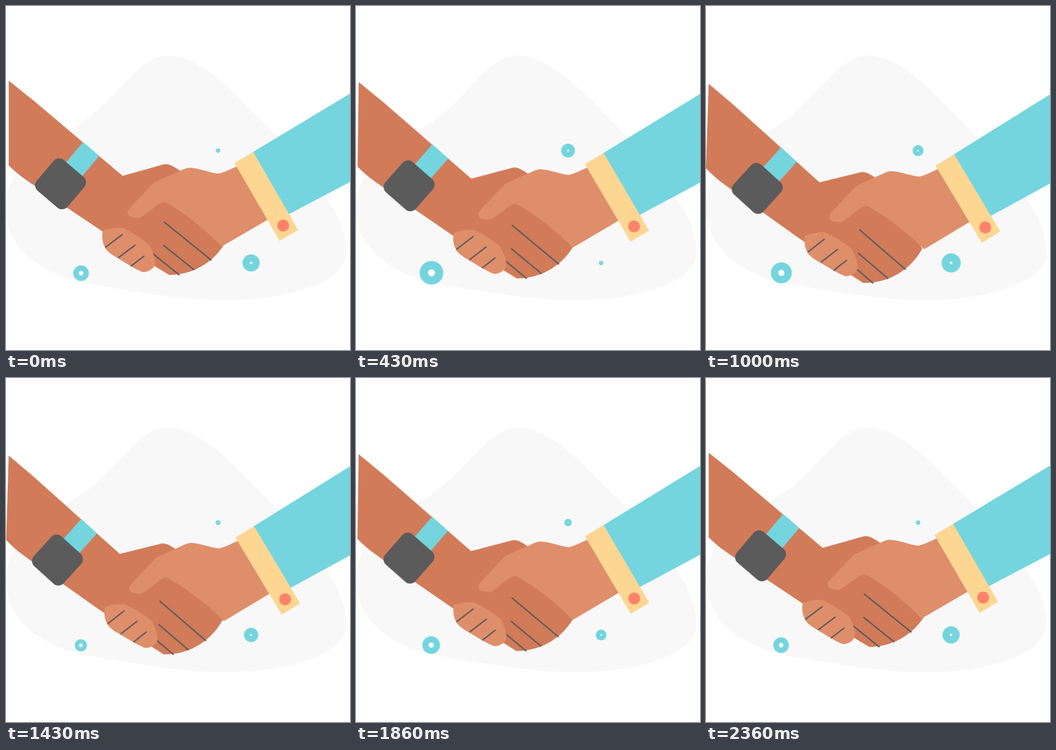
Recreate the animation shown at these times as an HTML page without scripts. Size 640 px wide and 640 px high, loop 2430 ms.

```html
<!DOCTYPE html>
<html lang="en">
<head>
<meta charset="utf-8">
<title>Handshake</title>
<style>
  html, body { margin: 0; width: 100%; height: 100%; overflow: hidden; background: #fff; }
  svg { display: block; width: 100vw; height: 100vh; }

  .dark { fill: #d17b58; }
  .light { fill: #df8e6a; }
  .teal { fill: #74d5de; }
  .hole { fill: #fff; }
  .crease { fill: none; stroke: #5b5b5b; stroke-width: 2.5; stroke-linecap: round; }

  .arm, .ring { animation: 2430ms linear infinite; }
  .left { transform-origin: -170px 139px; animation-name: shake; --turn: 2.13deg; }
  .right { transform-origin: 732px 174px; animation-name: shake; --turn: -1.1deg; }
  .a { animation-name: pulse-a; }
  .b { animation-name: pulse-b; }
  .c { animation-name: pulse-c; }

  @keyframes shake {
    0%, 97.12%, 100% { transform: rotate(0deg); }
    48.56% { transform: rotate(var(--turn)); }
  }
  @keyframes pulse-a {
    0%, 97.12%, 100% { transform: scale(1.45); }
    27.3% { transform: scale(2.6); }
    62.2% { transform: scale(.97); }
    84.9% { transform: scale(2.03); }
  }
  @keyframes pulse-b {
    0%, 97.12%, 100% { transform: scale(.41); }
    23.7% { transform: scale(1.58); }
    64.2% { transform: scale(.28); }
    82.1% { transform: scale(.88); }
  }
  @keyframes pulse-c {
    0%, 97.12%, 100% { transform: scale(1.6); }
    17.1% { transform: scale(.37); }
    46.2% { transform: scale(2.08); }
    70.6% { transform: scale(.65); }
    91.9% { transform: scale(1.91); }
  }
</style>
</head>
<body>
<svg viewBox="0 0 640 640">
  <path fill="#f8f8f8" d="M302 92C350 92 402 140 440 177C468 205 490 228 510 250C548 292 580 330 604 369C622 398 634 430 633.5 459C632 520 510 548 402 547.5C330 547 220 529 150 516C75 502 0 455 0 378C0 300 62 258 126 226C150 212 175 190 200 164C232 130 262 92 302 92Z"/>

  <g transform="translate(138 498.5)"><g class="ring a">
    <circle class="teal" cx="1.1" cy="-1" r="10"/>
    <circle class="hole" cx="1.1" cy="-1" r="2.9"/>
  </g></g>
  <g transform="translate(394.5 269)"><g class="ring b">
    <circle class="teal" r="10"/>
    <circle class="hole" r="1.4"/>
  </g></g>
  <g transform="translate(456 478)"><g class="ring c">
    <circle class="teal" r="10"/>
    <circle class="hole" r="1.4"/>
  </g></g>

  <g class="arm left">
    <path class="dark" d="M5 139L52 176.500L217 316L293 294.700C303 292.500 313 299 326 308L412 433C393 471 354 500 304 500.500L275 483L230 450L182 421L113 375L55 335.500C36 323 18 310 5 296.500Z"/>
    <path class="teal" d="M143.500 253L173.500 279L139 320L109 294Z"/>
    <rect x="-37.500" y="-37.500" width="75" height="75" rx="13.500" fill="#5b5b5b" transform="translate(101.500 330.800) rotate(40.500)"/>
    <path class="crease" d="M294.500 402L381.500 472.500M293.500 445.500L349.500 490.500M271 459L322 500"/>
  </g>

  <g class="arm right">
    <path class="light" d="M432 297C415 305 401 312 393 311.700C378 310 360 302 343 301C334 300.500 325 307 310 312.500L276 328L229 377C224.500 382 226 385 228.500 390.500C236 393.500 243 395 248 394.500C262 387 280 370 291 365.300C296 364 299 366 302 368C335 387 372 417 401 447L408 443.500L488 397Z"/>
    <path class="light" d="M180 418C195 413 208 412 217 413C232 420 250 431 264 442C270 448 275 462 277 473C280 486 267 495 255 495C246 493 226 480 205 467.500C190 458 186 454 183 447C179 439 178 428 180 418Z"/>
    <path class="crease" d="M185.500 448.500L216 425.500M209.500 468L240 445M233 483.500L256.500 465.500"/>
    <path class="teal" d="M458 272.500L640 163V327.500L525 388Z"/>
    <path fill="#fdd692" d="M425 292L460 271.500L543.500 416.500L509 437Z"/>
    <circle cx="515.700" cy="408.500" r="11" fill="#fd8269"/>
  </g>
</svg>
</body>
</html>
```
